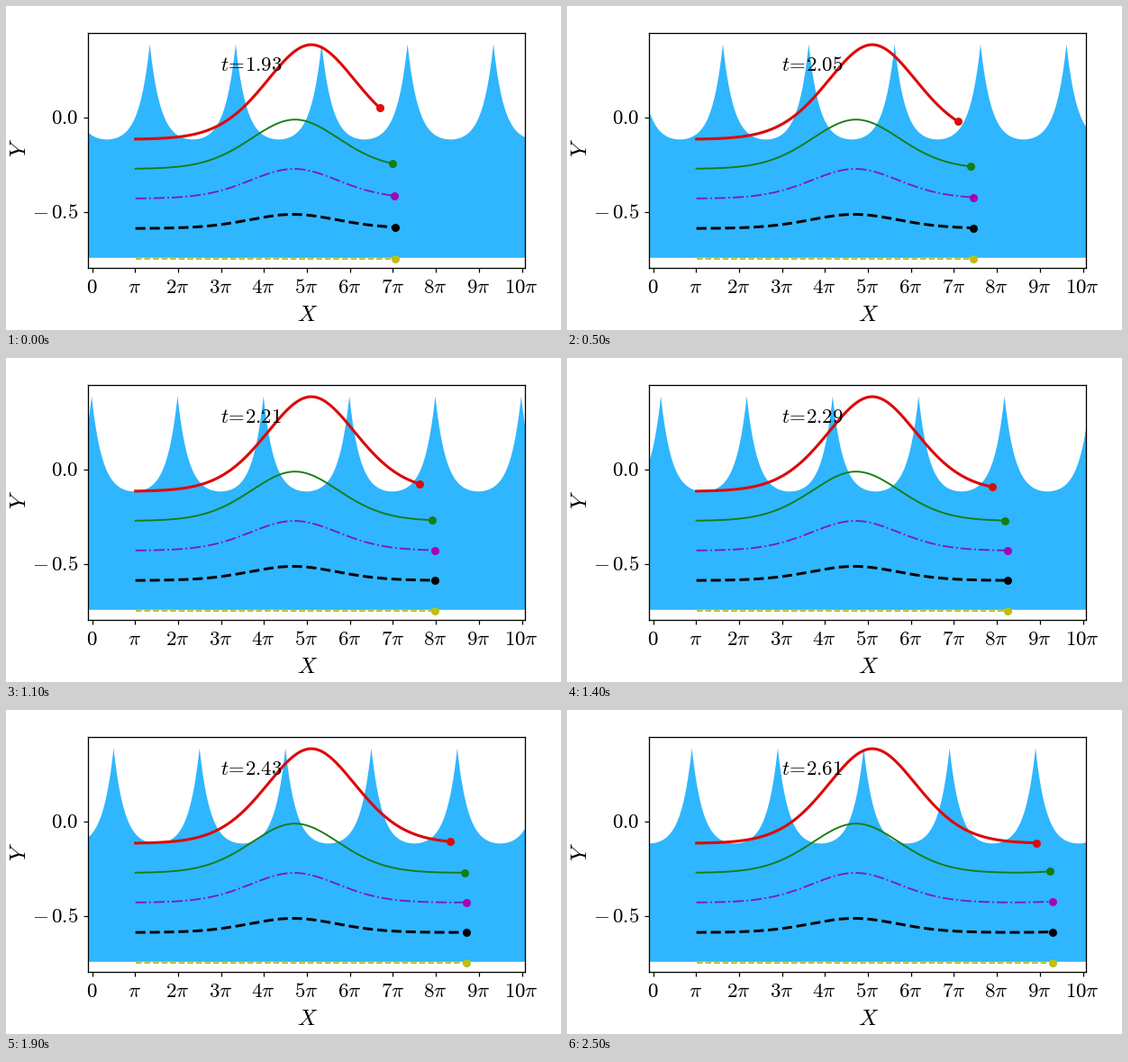
A matplotlib script for the animation above (2.6 s loop, 616x360 px).

```python
import numpy as np
import matplotlib.pyplot as plt
from matplotlib.animation import FuncAnimation

WIDTH, HEIGHT, DPI = 616, 360, 100
PX = 72 / DPI  # one pixel in points
FRAMES, INTERVAL = 26, 100

LEFT, RIGHT, TOP, BOTTOM = 91, 576, 30, 291
ORIGIN, PI_STEP = 95.5, 47.7
WAVELENGTH, CREST_Y, TROUGH_Y, BED_Y = 95.35, 42.3, 148.3, 279.8
START_X, START_TIME = 143.7, 1.93
CREST_X, WAVE_SPEED = 159.6, 109.7

plt.rcParams["mathtext.fontset"] = "cm"


class Particle:
    """Drifting marker whose trail rises once per drift period."""

    def __init__(self, ax, base, height, peak_x, spread, head_x, speed,
                 color, style, width, dot_color=None):
        self.base, self.height, self.spread = base, height, spread
        self.peak_x, self.head_x, self.speed = peak_x, head_x, speed
        self.line, = ax.plot([], [], style, color=color, lw=width * PX)
        self.dot, = ax.plot([], [], "o", color=dot_color or color,
                            ms=9 * PX, mew=0, zorder=4)

    def path(self, x):
        half = self.peak_x - START_X
        d = np.abs((x - self.peak_x + half) % (2 * half) - half)
        return self.base - self.height * np.exp(-d**2 / (4500 + self.spread * d))

    def update(self, t):
        head = self.head_x + self.speed * (t - START_TIME)
        x = np.linspace(START_X, head, 300)
        self.line.set_data(x, self.path(x))
        self.dot.set_data([head], [self.path(head)])


def surface(x, crest):
    """Sharp-crested periodic wave."""
    half, decay = WAVELENGTH / 2, 12
    d = np.abs((x - crest + half) % WAVELENGTH - half)
    rise = (np.cosh((half - d) / decay) - 1) / (np.cosh(half / decay) - 1)
    return TROUGH_Y - (TROUGH_Y - CREST_Y) * rise


def clock(frame):
    step = frame + frame // 3
    return np.interp(step, [0, 6, 14, 18, 22, 29, 33],
                     [START_TIME, 2.052, 2.211, 2.294, 2.381, 2.503, 2.608])


def label(x, y, text, size=23, **style):
    return ax.text(x, y, f"${text}$", fontsize=size * PX, zorder=6, **style)


fig = plt.figure(figsize=(WIDTH / DPI, HEIGHT / DPI), dpi=DPI, facecolor="white")
ax = fig.add_axes([LEFT / WIDTH, 1 - BOTTOM / HEIGHT,
                   (RIGHT - LEFT) / WIDTH, (BOTTOM - TOP) / HEIGHT])
ax.set(xlim=(LEFT, RIGHT), ylim=(BOTTOM, TOP))

ticks = [ORIGIN + PI_STEP * k for k in range(11)]
ax.set_xticks(ticks, [])
ax.set_yticks([123.5, 228.5], [])
ax.tick_params(length=5 * PX, width=1.2 * PX)
for spine in ax.spines.values():
    spine.set_linewidth(1.3 * PX)

for k, x in enumerate(ticks):
    text = "0" if k == 0 else (str(k) if k > 1 else "") + r"\pi"
    label(x - 0.6, 319, text, ha="center", va="baseline")
label(80, 131, "0.0", ha="right", va="baseline")
label(80, 236, r"-\,0.5", ha="right", va="baseline")
label(335, 350, "X", 25, ha="center", va="baseline")
label(15.5, 157.5, "Y", 25, ha="center", va="center", rotation=90)
time_text = label(238, 71.5, "t", 22.8, va="baseline")

water, = ax.fill([LEFT, RIGHT, RIGHT], [BED_Y, BED_Y, TROUGH_Y],
                 color="#2fb6fe", lw=0, zorder=1)
particles = [
    Particle(ax, 148.2, 105.2, 338.8, 9.9, 414.7, 156.5, "#dd0a0a", "-", 3.1),
    Particle(ax, 181, 54.8, 320.8, 7, 428.8, 158.4, "#147d14", "-", 1.9),
    Particle(ax, 214, 33, 319.8, 7, 431.2, 158.4, "#7a1cc8", "-.", 1.9, "#a800b5"),
    Particle(ax, 247.2, 15.7, 318.8, 7, 431.7, 158.5, "black", "--", 3),
    Particle(ax, 280.6, 0, 318.8, 7, 431.7, 158.5, "#bcbf14", "--", 1.8),
]
wave_x = np.linspace(LEFT, RIGHT, 1941)


def update(frame):
    t = clock(frame)
    y = surface(wave_x, CREST_X + WAVE_SPEED * (t - START_TIME))
    top = np.column_stack([wave_x, y])
    water.set_xy(np.vstack([top, [RIGHT, BED_Y], [LEFT, BED_Y]]))
    for particle in particles:
        particle.update(t)
    time_text.set_text(rf"$t\!=\!{t:.2f}$")


anim = FuncAnimation(fig, update, frames=FRAMES, interval=INTERVAL,
                     repeat=True, repeat_delay=0)
plt.show()
```
